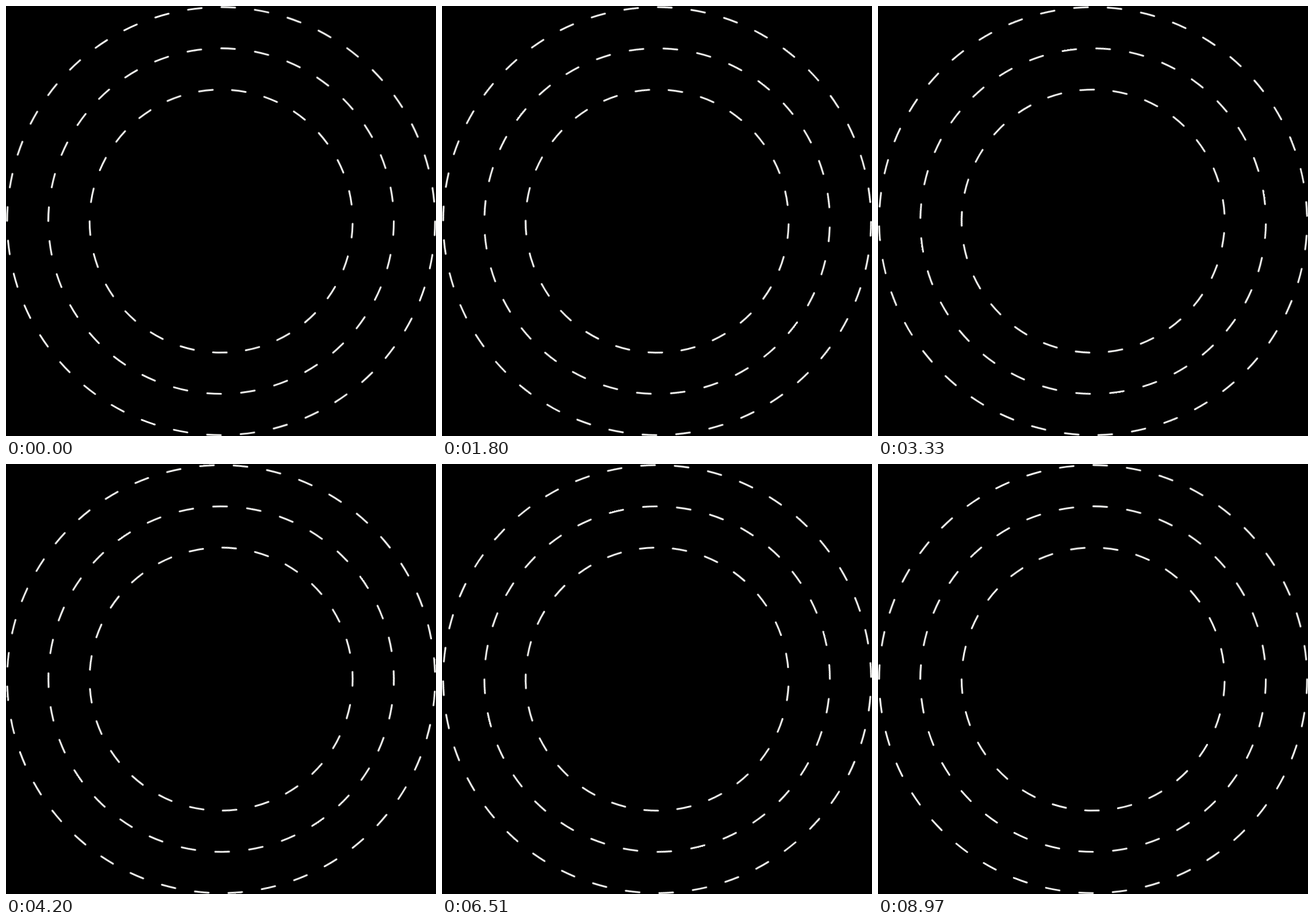
Write an HTML page without scripts that moves like this. It is 748 px wide and 748 px high and loops after 9000 ms.

```html
<!DOCTYPE html>
<html lang="en">
<head>
<meta charset="utf-8">
<title>Dashed rings</title>
<style>
  html, body { margin: 0; width: 100%; height: 100%; overflow: hidden; background: #000; }
  svg { display: block; width: 100vw; height: 100vh; }
  circle {
    fill: none;
    stroke: #fafaf8;
    stroke-width: 3;
    stroke-linecap: round;
    transform-origin: 0 0;
    animation: turn 9s linear infinite;
  }
  /* pathLength equals the dash count, so one period is one unit */
  .outer  { --turn: 180deg;  stroke-dasharray: .411 .589; }
  .middle { --turn: -270deg; stroke-dasharray: .407 .593; }
  .inner  { --turn: 360deg;  stroke-dasharray: .418 .582; }
  @keyframes turn {
    0% { transform: rotate(0deg); }
    99.6667%, 100% { transform: rotate(var(--turn)); }
  }
</style>
</head>
<body>
<svg viewBox="-374.2 -374.2 748 748">
  <g transform="rotate(.06)"><circle class="outer" r="372.2" pathLength="40"/></g>
  <g transform="rotate(.06)"><circle class="middle" r="300.5" pathLength="32"/></g>
  <g transform="rotate(1.1)"><circle class="inner" r="228.8" pathLength="25"/></g>
</svg>
</body>
</html>
```
